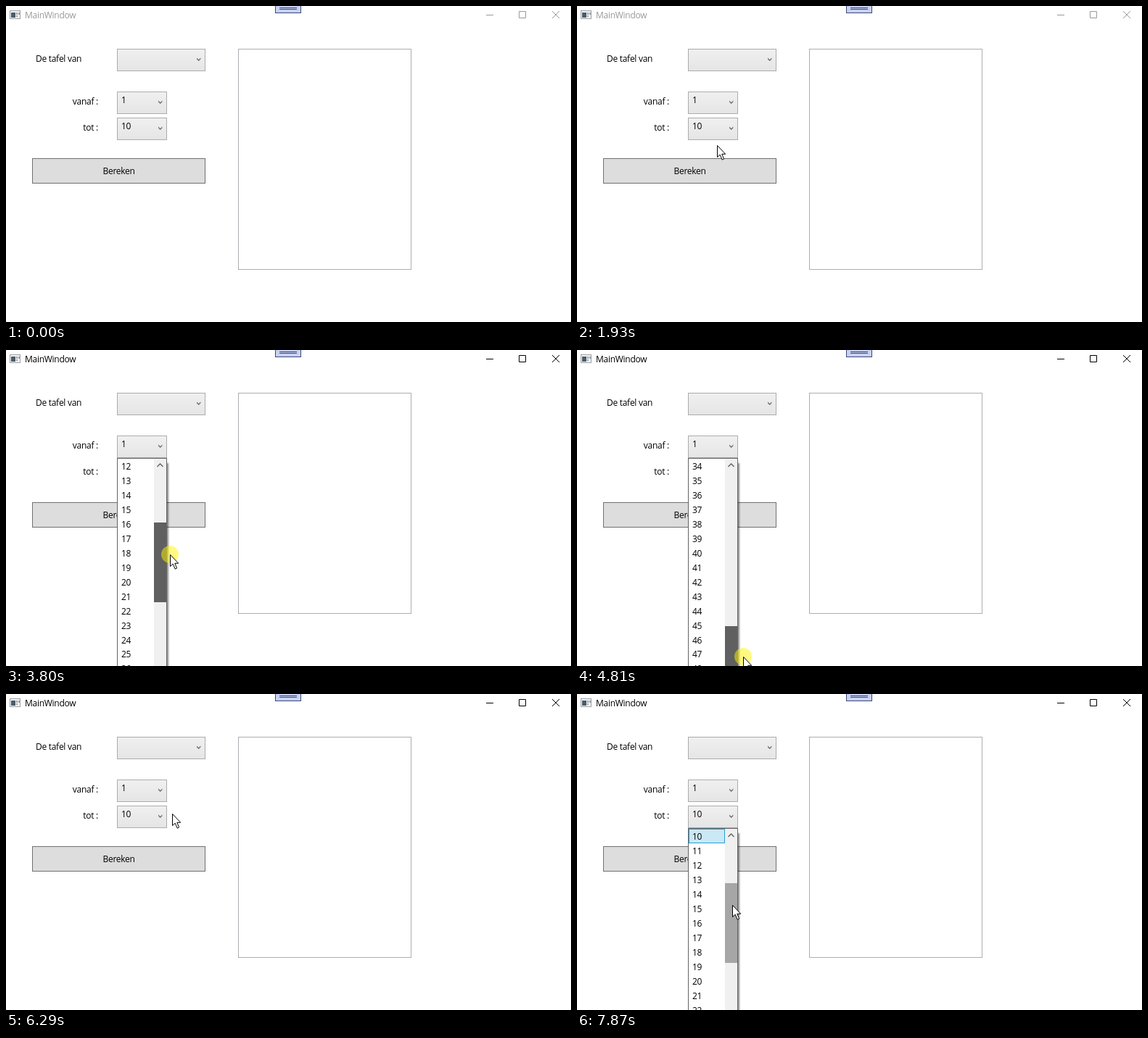
Recreate the animation shown at these times as an HTML page. Size 779x436 px, loop 8 s.

```html
<!DOCTYPE html>
<html lang="nl">
<head>
<meta charset="utf-8">
<title>MainWindow</title>
<style>
  html, body { margin: 0; width: 100%; height: 100%; overflow: hidden; background: #fff; }
  svg { display: block; }
  text { font: 12px "Open Sans", "Noto Sans", sans-serif; letter-spacing: -.28px; fill: #000; white-space: pre; }
  .end { text-anchor: end; }
  .mid { text-anchor: middle; }
  .caption { --ink: #999; }
  .caption.active { --ink: #000; }
  .caption text { fill: var(--ink); }
  .caption path { fill: none; stroke: var(--ink); }
  .combo rect { fill: url(#plain); stroke: #acacac; }
  .combo use { fill: #606060; }
  .combo.hover rect { fill: url(#lit); stroke: #7eb4ea; }
  .combo.hover use { fill: #000; }
  .chevron { fill: none; stroke: #606060; stroke-width: 1.4; }
</style>
</head>
<body>
<svg width="779" height="436" viewBox="0 0 779 436">
  <defs>
    <linearGradient id="plain" x2="0" y2="1">
      <stop stop-color="#f0f0f0"/><stop offset="1" stop-color="#e5e5e5"/>
    </linearGradient>
    <linearGradient id="lit" x2="0" y2="1">
      <stop stop-color="#ecf4fc"/><stop offset="1" stop-color="#dcecfc"/>
    </linearGradient>
    <filter id="soft" filterUnits="userSpaceOnUse" x="140" y="140" width="110" height="420">
      <feGaussianBlur stdDeviation="1.2"/>
    </filter>
    <path id="arrow" d="M0 0 2.67 2.67 5.33 0V-1.78L2.67.89 0-1.78Z"/>
  </defs>

  <!-- title bar -->
  <g>
    <rect x="5.5" y="6.5" width="14" height="11" fill="#f2f2f2" stroke="#a0a0a0"/>
    <rect x="7" y="9" width="6" height="7" fill="#4a5c6c"/>
    <path d="M14 9h2v3h-2zM17 9h2v3h-2zM14 13h2v2h-2z" fill="#9aa6b4"/>
  </g>
  <g id="caption" class="caption">
    <text x="26" y="17">MainWindow</text>
    <path d="M662 12.5h10M707.5 7.5h9v9h-9zM753 7l10 10M763 7l-10 10"/>
  </g>
  <rect x="371.5" y="-2.5" width="35" height="12" fill="#c9d1f2" stroke="#3b4a75"/>
  <path d="M377 2.5h24M377 4.5h24" stroke="#3b4a75"/>

  <!-- form -->
  <text x="41" y="77">De tafel van</text>
  <text x="127" y="136" class="end">vanaf :</text>
  <text x="127" y="172" class="end">tot :</text>
  <g class="combo">
    <rect x="153.5" y="59.5" width="121" height="30"/>
    <use href="#arrow" x="263" y="73.3"/>
  </g>
  <g id="from" class="combo">
    <rect x="153.5" y="118.5" width="68" height="30"/>
    <use href="#arrow" x="210" y="132.3"/>
    <text x="159" y="134">1</text>
  </g>
  <g id="to" class="combo">
    <rect x="153.5" y="154.5" width="68" height="30"/>
    <use href="#arrow" x="210" y="168.3"/>
    <text x="159" y="170">10</text>
  </g>
  <rect x="36.5" y="210.5" width="238" height="34" fill="#ddd" stroke="#707070"/>
  <text x="155.5" y="232" class="mid">Bereken</text>
  <rect x="320.5" y="59.5" width="238" height="304" fill="#fff" stroke="#abadb3"/>

  <!-- drop-down list -->
  <g id="popup">
    <rect id="shade" x="159" width="65" opacity=".45" filter="url(#soft)"/>
    <svg id="slide" x="153" width="69" overflow="hidden">
      <g id="list">
        <rect x=".5" y=".5" width="68" height="359" fill="#fff" stroke="#646464"/>
        <rect id="mark" x="1.5" width="49" height="19" fill="#cbe8f6" stroke="#26a0da"/>
        <g id="items"></g>
        <rect x="51" y="1" width="17" height="358" fill="#f0f0f0"/>
        <path class="chevron" d="M55.5 12l4-4 4 4"/>
        <path class="chevron" d="M55.5 347l4 4 4-4" stroke-opacity=".7"/>
        <rect id="thumb" x="51" width="17" height="110"/>
      </g>
    </svg>
  </g>

  <g id="pointer">
    <circle id="press" r="12" fill="#fff500" opacity=".5"/>
    <path d="M.5.5V16.6L4.2 13.2 7.2 20.2 9.6 19 6.8 12.3H11.7Z" fill="#fff" stroke="#000"/>
  </g>
</svg>
<script>
const LOOP = 8000, TICK = 78, SYNC = 2700;
const ROW = 19.96, ROWS = 18, FULL = 360, LAST = 33, NOTCH = 6.48;
const $ = id => document.getElementById(id);
const set = (id, attrs) => { for (const k in attrs) $(id).setAttribute(k, attrs[k]); };
const show = (id, on) => { $(id).style.display = on ? '' : 'none'; };
const clamp = (v, lo, hi) => Math.max(lo, Math.min(hi, v));
const during = (t, s) => t >= s.from && t < s.to;

// the screen refreshes on a fixed tick
const refreshed = t => SYNC + Math.floor((t - SYNC) / TICK) * TICK;

// pointer stops: [time, x, y]
const stops = [
  [825, 561, 400], [1600, 196, 146], [1770, 193, 192], [1930, 193, 192],
  [2400, 209, 133], [2860, 209, 133], [3300, 213, 210], [3794, 226, 282],
  [4300, 230, 423], [4810, 229, 423], [5560, 229, 140], [5880, 264, 136],
  [5990, 264, 136], [6280, 229, 165], [6600, 213, 168], [6930, 213, 168],
  [7400, 231, 290], [7840, 214, 291]];
const activate = { from: 2540, to: 2700 };
const drag = { from: 3300, to: 5500, y: 210 };
const dismiss = { from: 5880, to: 5970 };
const reopen = { from: 6900, to: 7000 };
const presses = [activate, drag, dismiss, reopen];
const popups = [
  { from: activate.to, to: dismiss.to, y: 149, first: 0 },
  { from: 6930, to: LOOP, y: 185, first: 9 }];

for (let i = 0; i < ROWS; i++) {
  const row = document.createElementNS('http://www.w3.org/2000/svg', 'text');
  row.setAttribute('x', 6);
  row.setAttribute('y', Math.round(16 + i * ROW));
  $('items').append(row);
}

function pointerAt(t) {
  const i = stops.findIndex(s => s[0] > t);
  if (i === 0) return [-50, -50];
  if (i < 0) return stops[stops.length - 1].slice(1);
  const [ta, xa, ya] = stops[i - 1], [tb, xb, yb] = stops[i];
  const k = (t - ta) / (tb - ta);
  return [Math.round(xa + (xb - xa) * k), Math.round(ya + (yb - ya) * k)];
}

function drawPopup(p, t, x, y) {
  const h = Math.min(FULL, Math.round((t - p.from) * 2.02));
  const dragging = during(t, drag);
  const top = dragging ? clamp(Math.round((y - drag.y) / NOTCH), 0, LAST) : p.first;
  const thumbY = Math.round(18 + top * NOTCH);
  const over = x >= 204 && x < 222 && y >= p.y + thumbY && y < p.y + thumbY + 110;

  set('slide', { y: p.y, height: h });
  set('list', { transform: `translate(0 ${h - FULL})` });
  set('shade', { y: p.y + 7, height: Math.max(0, h - 5) });
  set('mark', { y: 1.5 + Math.round((p.first - top) * ROW) });
  show('mark', top <= p.first);
  set('thumb', { y: thumbY, fill: dragging ? '#606060' : over ? '#a6a6a6' : '#cdcdcd' });
  [...$('items').children].forEach((row, i) => {
    row.textContent = top + i < 50 ? top + i + 1 : '';
  });
}

function draw(now) {
  const t = refreshed(now % LOOP);
  const [x, y] = pointerAt(t);
  const popup = popups.find(p => during(t, p));
  const within = top => x >= 153 && x < 222 && y >= top && y < top + 31;

  $('caption').classList.toggle('active', t >= activate.from);
  $('from').classList.toggle('hover', within(118));
  $('to').classList.toggle('hover', within(154));
  show('popup', popup);
  if (popup) drawPopup(popup, t, x, y);
  show('press', presses.some(p => during(t, p)));
  set('pointer', { transform: `translate(${x} ${y})` });
}

const start = performance.now();
function tick() {
  draw(performance.now() - start);
  requestAnimationFrame(tick);
}
tick();
</script>
</body>
</html>
```
